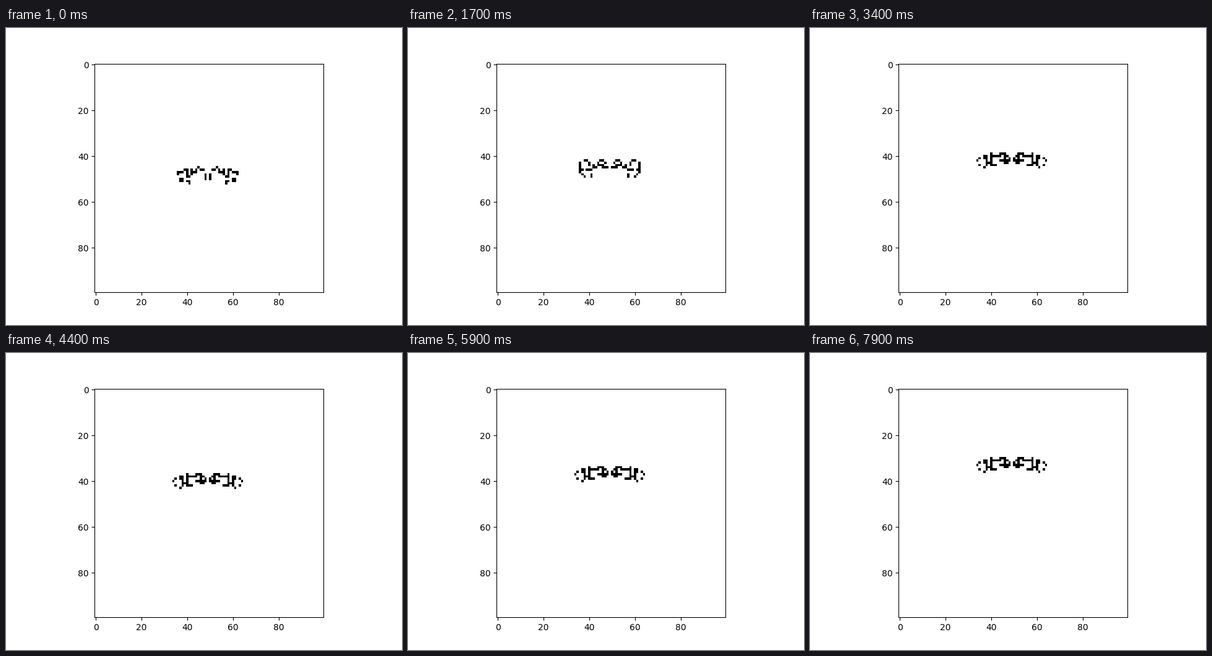
These frames come from a looping animation (640x480 px, 8 s). A matplotlib script:

```python
import matplotlib.pyplot as plt
import numpy as np
from matplotlib.animation import FuncAnimation

SIZE = 100
FRAMES = 80
TOP, LEFT = 45, 36

# Left half of a mirror-symmetric glider; the last column is the axis.
HALF = [
    ".........O....",
    "...OO.O.O.OO..",
    "OOO.O.OOO.....",
    "O...O.O.....O.",
    "....OO......O.",
    ".OO.........O.",
    ".OO.OO........",
    ".....O........",
]


def seed_grid():
    grid = np.zeros((SIZE, SIZE), dtype=int)
    for r, half in enumerate(HALF):
        row = half + half[-2::-1]
        grid[TOP + r, LEFT:LEFT + len(row)] = [c == "O" for c in row]
    return grid


def step(grid):
    """One generation of Conway's Life on a torus."""
    near = sum(
        np.roll(grid, (dy, dx), (0, 1))
        for dy in (-1, 0, 1)
        for dx in (-1, 0, 1)
        if dy or dx
    )
    return ((near == 3) | ((grid == 1) & (near == 2))).astype(int)


generations = [seed_grid()]
while len(generations) < FRAMES:
    generations.append(step(generations[-1]))

fig, ax = plt.subplots(figsize=(6.4, 4.8), dpi=100)
image = ax.imshow(generations[0], cmap="binary", vmin=0, vmax=1,
                  interpolation="nearest")


def update(i):
    image.set_data(generations[i])
    return [image]


anim = FuncAnimation(fig, update, frames=FRAMES, interval=100,
                     repeat=True, repeat_delay=0)
plt.show()
```
